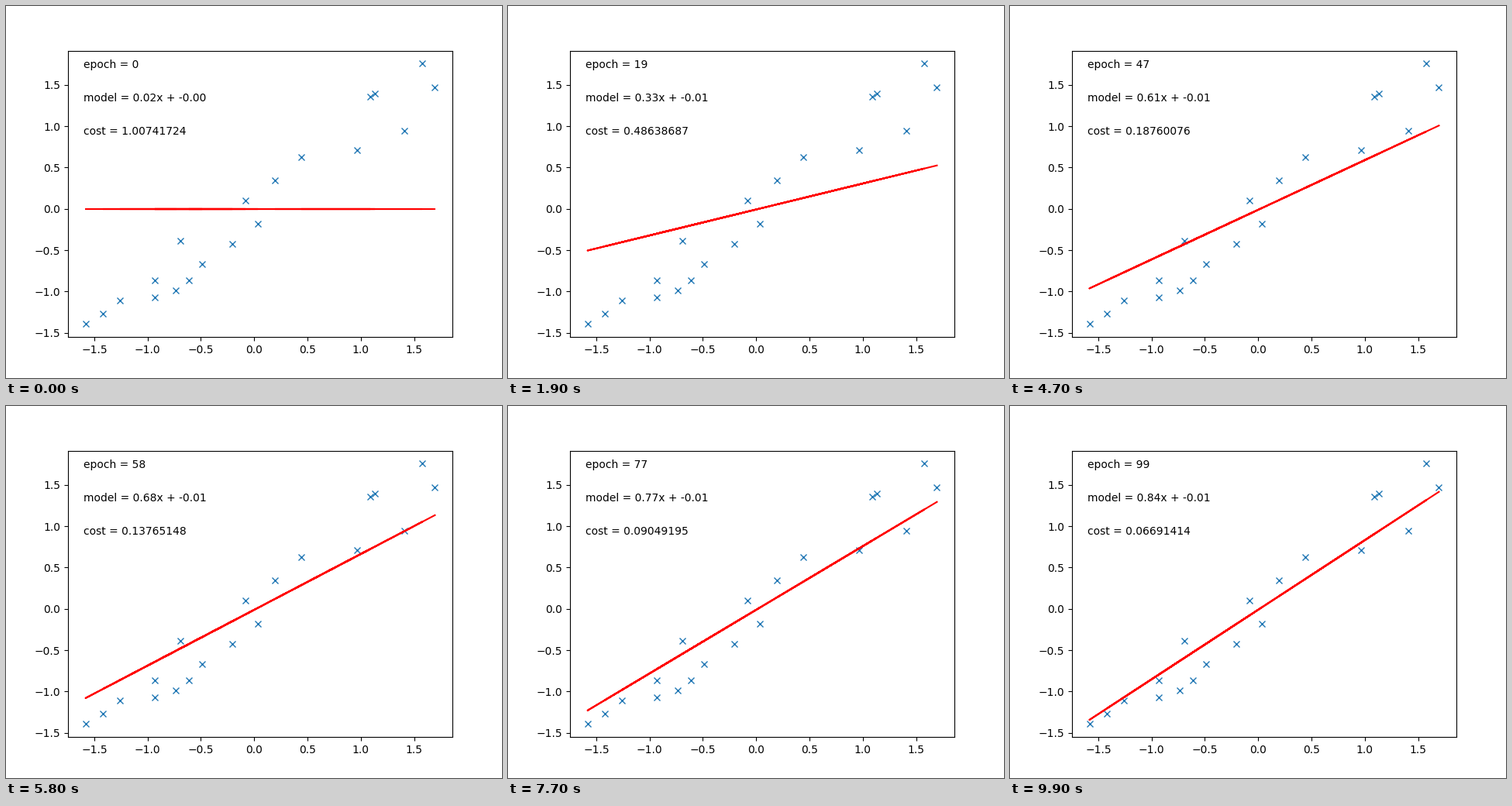
Write a matplotlib script that moves like this. It is 640 by 480 pixels and loops after 10 s.

```python
import numpy as np
import matplotlib.pyplot as plt
from matplotlib.animation import FuncAnimation

EPOCHS = 100
RATE = 0.01

# The observations in the order the fitted line visits them
x, y = np.array([
    (1.6945, 1.47), (-0.613, -0.8645), (1.575, 1.7565), (1.408, 0.945),
    (0.441, 0.626), (1.1315, 1.395), (0.194, 0.345), (1.088, 1.357),
    (0.964, 0.7105), (-0.932, -1.071), (-0.206, -0.424), (-1.2595, -1.108),
    (-0.082, 0.101), (-1.5825, -1.393), (-0.489, -0.6675), (-0.932, -0.8645),
    (0.034, -0.18), (-0.6925, -0.3865), (-1.419, -1.2675), (-0.736, -0.986),
]).T


def descend():
    """Slope, intercept and cost before the first step and after each one."""
    w = b = 0.0
    states = []
    for _ in range(EPOCHS + 1):
        err = w * x + b - y
        states.append((w, b, np.mean(err ** 2)))
        w -= 2 * RATE * np.mean(err * x)
        b -= 2 * RATE * np.mean(err)
    return states


states = descend()

fig, ax = plt.subplots(figsize=(6.4, 4.8), dpi=100)
ax.plot(x, y, "x")
line, = ax.plot(x, 0 * x, "r")
labels = [ax.text(-1.6, 1.7 - 0.4 * row, "") for row in range(3)]


def update(epoch):
    w, b, cost = states[epoch]
    line.set_ydata(w * x + b)
    # The model text already shows the step taken in this epoch
    w, b, _ = states[epoch + 1]
    labels[0].set_text(f"epoch = {epoch}")
    labels[1].set_text(f"model = {w:.2f}x + {b:.2f}")
    labels[2].set_text(f"cost = {cost:.8f}")
    return [line, *labels]


anim = FuncAnimation(fig, update, frames=EPOCHS, interval=100,
                     repeat=True, repeat_delay=0)
plt.show()
```
